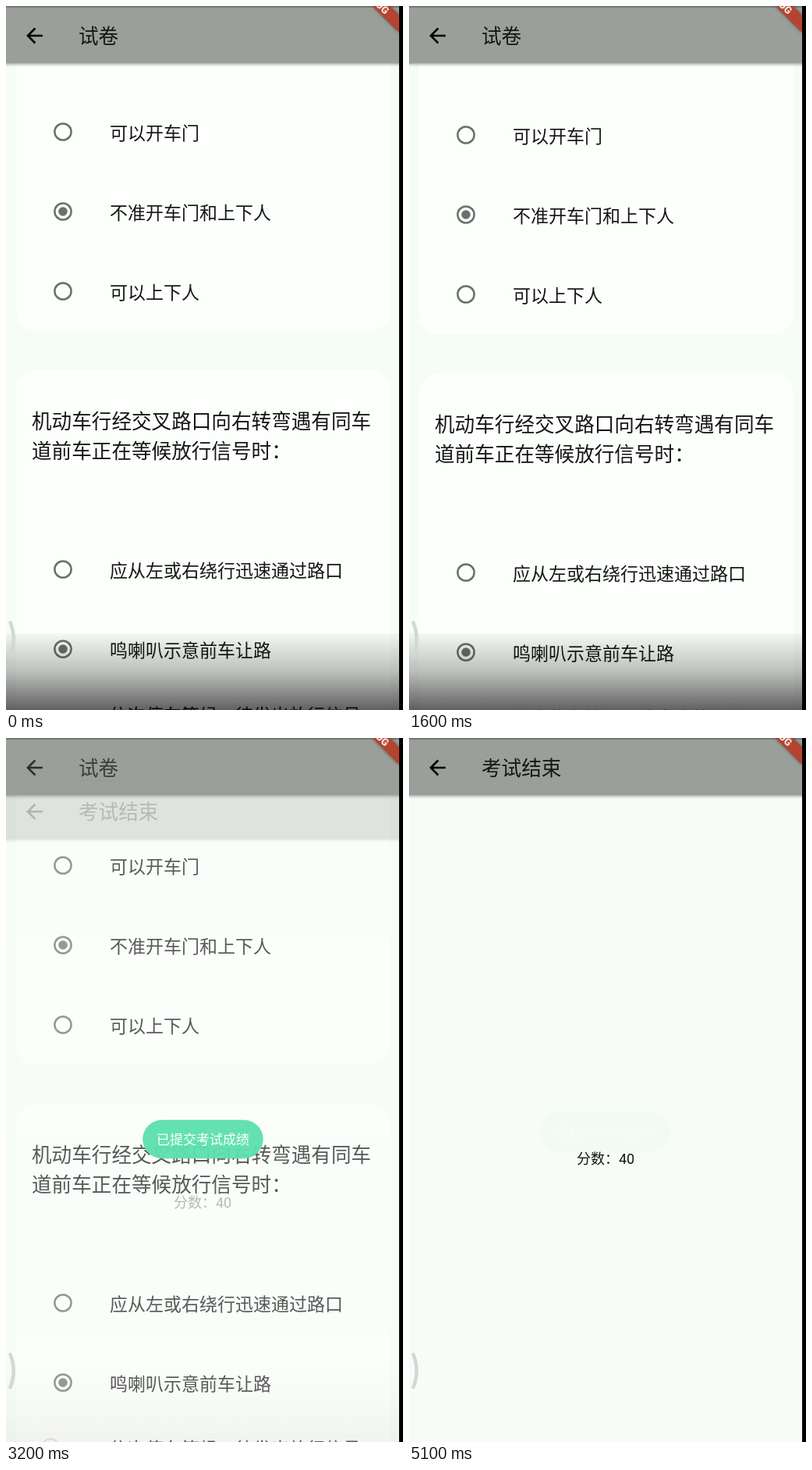
Recreate the animation shown at these times as an HTML page. Size 509 by 901 pixels, loop 5800 ms.

```html
<!DOCTYPE html>
<html lang="zh-CN">
<head>
<meta charset="utf-8">
<style>
  html, body { margin: 0; width: 100%; height: 100%; overflow: hidden; background: #f7fcf7; }
  svg { display: block; width: 509px; height: 901px; }
  text { font-family: Roboto, "Noto Sans CJK SC", "Noto Sans CJK", sans-serif; fill: #141614; }
  .title { font-size: 25.6px; }
  .option { font-size: 23px; }
  .bar { fill: #9b9f99; filter: drop-shadow(0 1px 2px #0007); }
  .card { fill: #fcfffc; }
  .radio { fill: none; stroke: #6c706c; stroke-width: 2.5; }
  .dot { fill: #6c706c; }
</style>
</head>
<body>
<svg viewBox="0 0 509 901">
  <defs>
    <linearGradient id="shade" x2="0" y2="1">
      <stop offset="0" stop-opacity=".03"/>
      <stop offset=".5" stop-opacity=".25"/>
      <stop offset="1" stop-opacity=".62"/>
    </linearGradient>
    <path id="back" transform="translate(20.9 22.4) scale(1.3)"
      d="M20 11H7.83l5.59-5.59L12 4l-8 8 8 8 1.41-1.41L7.83 13H20z"/>
  </defs>

  <rect width="509" height="901" fill="#f6fcf6"/>
  <g id="list"></g>
  <rect id="fade" y="803" width="504" height="98" fill="url(#shade)"/>
  <circle id="ring" cy="908" r="11" fill="none" stroke="#e0605a" stroke-width="2"/>
  <rect class="bar" x="-4" y="-4" width="517" height="77"/>
  <g id="heading">
    <use href="#back"/>
    <text class="title" x="93" y="47.5">试卷</text>
  </g>

  <g id="result">
    <rect width="509" height="901" fill="#f7fcf7"/>
    <rect class="bar" x="-4" width="517" height="73"/>
    <use href="#back"/>
    <text class="title" x="93" y="47.5">考试结束</text>
    <text x="215" y="544.5" font-size="18">分数：40</text>
  </g>

  <g id="toast">
    <rect x="-92.5" y="-29.5" width="185" height="59" rx="29.5" fill="#5ee0ae"/>
    <text y="8" font-size="20.4" text-anchor="middle" style="fill:#fff">已提交考试成绩</text>
  </g>

  <path d="M5.5 789Q14 810 5.5 831" fill="none" stroke="#d3d8d3" stroke-width="4.5" stroke-linecap="round"/>
  <rect width="504" height="2" fill="#747873"/>
  <path d="M470 0H492L504 12V34Z" fill="#b5432f" style="filter:drop-shadow(0 0 2px #0008)"/>
  <text transform="translate(485.7 11.3) rotate(45)" font-size="13" font-weight="900"
    text-anchor="end" style="fill:#f4e8e2">DEBUG</text>
  <rect x="504" width="5" height="901"/>
</svg>

<script>
const LOOP = 5800, STEP = 100;
const $ = id => document.getElementById(id);

const card = (top, bottom) =>
  `<rect class="card" x="13" y="${top}" width="480" height="${bottom - top}" rx="25"/>`;
const title = (x, y, s) => `<text class="title" x="${x}" y="${y + 9.7}">${s}</text>`;
const label = (y, s) => `<text class="option" x="133" y="${y + 10}">${s}</text>`;
const option = (y, s, on) => label(y, s) +
  `<circle class="radio" cx="73" cy="${y}" r="10.6"/>` +
  (on ? `<circle class="dot" cx="73" cy="${y}" r="5.8"/>` : '');

$('list').innerHTML =
  card(-400, -143) + label(-176, '行左转') +
  card(-93, 416) + title(125, -29, '在车辆没有停稳之前：') +
  option(161, '可以开车门') +
  option(263, '不准开车门和上下人', true) +
  option(365, '可以上下人') +
  card(466, 1000) +
  title(33, 531, '机动车行经交叉路口向右转弯遇有同车') +
  title(33, 569, '道前车正在等候放行信号时：') +
  option(721, '应从左或右绕行迅速通过路口') +
  option(823, '鸣喇叭示意前车让路', true) +
  label(906, '依次停车等候，待发出放行信号');

// Piecewise linear value through [time, value] points
function track(t, points) {
  let [t0, v0] = points[0];
  for (const [t1, v1] of points) {
    if (t < t1) return t <= t0 ? v0 : v0 + (v1 - v0) * (t - t0) / (t1 - t0);
    [t0, v0] = [t1, v1];
  }
  return v0;
}

// Cubic Bezier easing, solved by bisection
function ease(p, x1, y1, x2, y2) {
  if (p <= 0 || p >= 1) return p <= 0 ? 0 : 1;
  const at = (u, a, b) => 3 * u * (1 - u) * ((1 - u) * a + u * b) + u ** 3;
  let lo = 0, hi = 1;
  for (let i = 0; i < 24; i++) {
    const mid = (lo + hi) / 2;
    if (at(mid, x1, x2) < p) lo = mid; else hi = mid;
  }
  return at(lo, y1, y2);
}

const scroll = [[600, 0], [700, 90], [800, 195], [900, 242], [1100, 242], [1200, 150],
  [1300, 54], [1400, 22], [1500, 9], [1600, 4], [1700, 4], [1800, 2]];
const shade = [[2400, 1], [2900, .2], [3200, .1], [3500, 0]];
const toastScale = [[3100, .74], [3200, .835], [3400, .95], [3700, 1], [4800, 1], [5100, .905]];
const toastAlpha = [[3000, 0], [3100, .5], [3200, .96], [3300, 1],
  [4800, 1], [4900, .75], [5000, .3], [5100, .035]];

function draw(now) {
  const t = Math.floor(now % LOOP / STEP) * STEP;
  const move = (id, s) => $(id).setAttribute('transform', s);
  const alpha = (id, v) => $(id).setAttribute('opacity', v);

  move('list', `translate(0 ${track(t, scroll)})`);
  alpha('fade', track(t, shade));

  $('ring').setAttribute('cx', track(t, [[2400, 3], [2900, 57]]));
  alpha('ring', t < 2400 ? 0 : track(t, [[2400, 1], [3200, .3], [3400, 0]]));

  const p = (t - 2950) / 520;
  const shown = ease(p, .42, 0, 1, 1);
  move('result', `translate(0 ${225 * (1 - ease(p, .4, 0, .2, 1))})`);
  alpha('result', shown);
  alpha('heading', 1 - shown);

  const size = track(t, toastScale);
  const drop = (t < 4000 ? 72.7 : 31) * (1 - size);
  move('toast', `translate(252.5 ${501.5 + drop}) scale(${size})`);
  alpha('toast', track(t, toastAlpha));

  requestAnimationFrame(draw);
}
requestAnimationFrame(draw);
</script>
</body>
</html>
```
